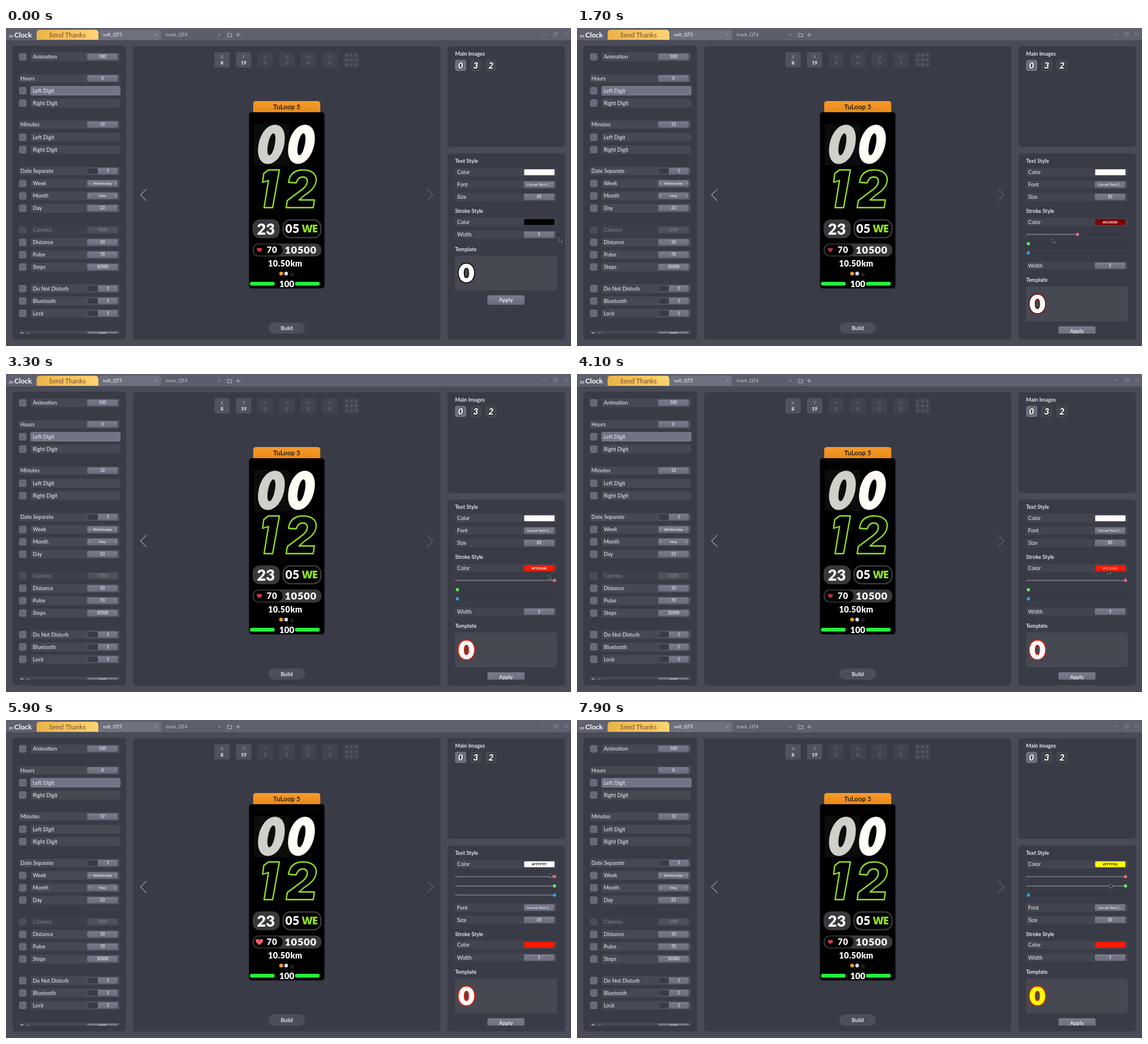
Recreate the animation shown at these times as an HTML page. Size 960 px wide and 540 px high, loop 8000 ms.

```html
<!DOCTYPE html>
<html lang="en">
<head>
<meta charset="utf-8">
<title>Watch face editor</title>
<style>
html, body { margin: 0; width: 100%; height: 100%; overflow: hidden; background: #494b57; }
svg { display: block; width: 960px; height: 540px; font-family: Lato, "Open Sans", sans-serif; font-weight: 500; }
text { white-space: pre; }
</style>
</head>
<body>
<svg id="stage" viewBox="0 0 960 540"></svg>
<script>
const FIELD = 'url(#field)', BAR = '#464854', PANEL = '#393b46', PALE = '#e4e5ea';

// y is the vertical centre of the capitals
const text = (x, y, s, size = 9, fill = PALE, attrs = '') =>
  `<text x="${x}" y="${y + size * .36}" font-size="${size}" fill="${fill}" ${attrs}>${s}</text>`;
const mid = (x, y, s, size, fill, attrs = '') => text(x, y, s, size, fill, 'text-anchor="middle" ' + attrs);
const bold = 'font-weight="700"', heavy = 'font-weight="900"';
const box = (x, y, w, h, fill, r = 2, attrs = '') =>
  `<rect x="${x}" y="${y}" width="${w}" height="${h}" rx="${r}" fill="${fill}" ${attrs}/>`;
const dot = (x, y, r, fill) => `<circle cx="${x}" cy="${y}" r="${r}" fill="${fill}"/>`;
const path = (d, stroke, width = 1, attrs = 'fill="none"') =>
  `<path d="${d}" stroke="${stroke}" stroke-width="${width}" ${attrs}/>`;

// squarish oval around the origin
const oval = (a, b) => {
  const p = a * .6, q = b * .58;
  return `M0 ${-b}C${p} ${-b} ${a} ${-q} ${a} 0S${p} ${b} 0 ${b}S${-a} ${q} ${-a} 0S${-p} ${-b} 0 ${-b}Z`;
};
const zero = (x, y, [a, b, c, d], fill, attrs = '', skew = 0) =>
  `<path transform="translate(${x} ${y}) skewX(${skew})" d="${oval(a, b)}${oval(c, d)}" fill="${fill}" fill-rule="evenodd" ${attrs}/>`;

function field(y, value, x = 138, size = 6.8) {
  return box(x, y - 5.5, 52, 11, FIELD, 1.5) + mid(x + 26, y, value, size, PALE, bold);
}

// kinds of value: undefined, number, 'toggle', or a word with arrows
function listRow(y, label, value, head) {
  const chosen = y == 106.5;
  let s = head ? box(22, y - 7, 172, 14, BAR) :
    box(22, y - 6.5, 13, 13, '#676978', 3) + box(42, y - 7.5, 152, 15, chosen ? '#727485' : BAR, 2,
      chosen ? 'stroke="#8b8d9c" stroke-width=".8"' : '');
  s += text(head ? 24.5 : 45.5, y, label);
  if (value == 'toggle')
    s += box(138.5, y - 5, 51, 10, PANEL, 1.5, 'stroke="#5a5c69" stroke-width=".8"') +
      box(156, y - 5.5, 34, 11, FIELD, 1.5) + mid(173, y, '1', 6.8, PALE, bold);
  else if (typeof value == 'string')
    s += field(y, value, 138, 6.3) +
      path(`M142.5 ${y - 1.5}l-1.5 1.5 1.5 1.5M185.8 ${y - 1.5}l1.5 1.5-1.5 1.5`, PALE, .8);
  else if (value != null) s += field(y, value);
  return s;
}

function titleBar() {
  const tab = (x, w, name, fill, color) => box(x, 3, w, 24, fill, 4) + text(x + 6.5, 11.5, name, 8, color) +
    path(`M${x + w - 9} 10l3 3m0-3l-3 3`, '#b0b1ba', .8);
  return box(0, 0, 960, 21, '#5f616f', 0) + `<g clip-path="url(#title)">` + box(52, 3, 105, 24, 'url(#gold)', 5) +
    tab(158, 105, 'volt_QT5', '#6f717e', '#f2f2f5') + tab(265, 105, 'track_QT4', '#5c5e6b', '#c3c4cc') + '</g>' +
    text(5, 13, 'zo', 7, PALE, bold) + text(14, 12, 'Clock', 12, '#fff', bold) +
    mid(104.5, 11.5, 'Send Thanks', 11.2, '#855331') +
    path('M376.5 9v6h7v-5h-3.5l-1-1zM391 11.5h7m-3.5-3.5v7', '#c3c4cc', .9) +
    path('M912 10.5h7M930.5 9h5v5h-5zM932.5 9v-2h5v5h-2M948 7l7 7m0-7l-7 7', '#858792', .9);
}

function leftPanel() {
  const rows = [
    [49, 'Animation', 100], [85.5, 'Hours', 0, 1], [106.5, 'Left Digit'], [127.5, 'Right Digit'],
    [164, 'Minutes', 12, 1], [185.5, 'Left Digit'], [206.5, 'Right Digit'],
    [243, 'Date Separate', 'toggle', 1], [264, 'Week', 'Wednesday'], [285, 'Month', 'May'], [306, 'Day', 23],
    [364, 'Distance', 10], [385, 'Pulse', 70], [406, 'Steps', 10500],
    [442.5, 'Do Not Disturb', 'toggle'], [463.5, 'Bluetooth', 'toggle'], [484.5, 'Lock', 'toggle'], [521, 'Battery', 100, 1]
  ];
  return box(11, 30, 193, 499, PANEL, 5) + `<g clip-path="url(#list)">` +
    rows.map(r => listRow(...r)).join('') + `<g opacity=".38">${listRow(343, 'Calories', 1000)}</g></g>`;
}

function centrePanel() {
  let s = box(216, 31, 522, 498, PANEL, 5);
  [['X', 8], ['Y', 19], ['H', 0], ['W', 0], ['SX', 0], ['SY', 0]].forEach(([name, value], i) => {
    const x = 354 + i * 36.7, on = i < 2;
    s += box(x, 41, 26, 26, on ? '#50525e' : '#41434e', 3) +
      mid(x + 13, 49, name, 8, on ? '#9a9ca7' : '#5e606b') + mid(x + 13, 59, value, 8.3, on ? '#fff' : '#6c6e79', bold);
  });
  s += box(574, 41, 26, 26, '#41434e', 3);
  for (let i = 0; i < 9; i++) s += dot(579 + i % 3 * 8, 46 + (i / 3 | 0) * 8, 2.3, '#555763');
  return s + path('M238.5 273.5l-10 10 10 10', '#92949f', 1.4) + path('M715.5 273.5l10 10-10 10', '#5d5f6b', 1.4) +
    box(446, 500, 62, 19, '#4c4e5b', 9) + mid(477, 509.5, 'Build', 9, PALE, bold);
}

function watch() {
  const big = [21.8, 33.3, 5.8, 18.5], grey = '#39393c', green = '#92e01f';
  const outline = 'fill="none" stroke-linejoin="round"';
  return box(411, 142, 132, 302, '#34363f', 6) +
    `<path d="M420 143v-14q0-5 5-5h104q5 0 5 5v14z" fill="url(#orange)"/>` + mid(477, 133.5, 'TuLoop 5', 11.2, '#2a2017', bold) +
    box(413, 143, 128, 299, '#000', 5) + box(421, 163, 60, 70, '#0c0c0c', 0) +
    zero(451, 197.5, big, '#d0cfca', '', -10.5) + zero(502, 197.5, big, '#fffdf6', '', -10.5) +
    path('M446 241H464.5L453 305H438.5L446 259L436 262L438 247Z', green, 2.3, outline) +
    path('M480 262C482 248 491 241 505 241C519 241 528 248 527 259C526 270 518 277 507 284L498 292H524L522 305H476L478 293L502 275C509 270 512 266 512 260C512 255 509 253 504 253C499 253 495 257 493 263Z',
      green, 2.3, outline) +
    box(419, 325, 46, 32, grey, 12) + mid(441.5, 341, '23', 26.5, '#fff', heavy) +
    box(471, 326, 64, 30, '#000', 12, `stroke="${grey}" stroke-width="2.5"`) +
    text(474.5, 341, '05', 20.5, '#fff', heavy) +
    text(502.5, 341, 'WE', 18, green, 'font-family="Open Sans, sans-serif" font-weight="800" letter-spacing="-1.2"') +
    box(419, 366, 117, 22, grey, 10) + box(421, 367.5, 49, 19, '#000', 9) +
    text(443, 377, '70', 14.5, '#fff', heavy + ' letter-spacing=".6"') +
    text(473.5, 377, '10500', 17.5, '#fff', heavy + ' letter-spacing=".7"') +
    mid(474.5, 399.5, '10.50km', 14, '#fff', heavy + ' letter-spacing=".4"') +
    dot(467.5, 417, 3.2, '#f29a2c') + dot(476, 417, 3.2, '#d6d6d6') + dot(486, 418.5, 3.2, '#1f1f20') +
    box(414.5, 431, 42, 6.5, '#27ee3f', 3) + box(491, 431, 42, 6.5, '#27ee3f', 3) + mid(477, 434.5, '100', 14.7, '#fff', heavy);
}

function images() {
  return box(750, 31, 200, 171, PANEL, 5) + box(750, 213, 200, 316, PANEL, 5) + text(763, 44, 'Main Images', 9, PALE, bold) +
    ['0', '3', '2'].map((d, i) => box(763 + i * 25.8, 54, 19, 19, i ? '#444650' : '#6f7181', 4) +
      mid(772.3 + i * 25.8, 63.5, d, 15.5, '#fff', heavy + ' font-style="italic" stroke="#111" stroke-width="1.4" paint-order="stroke"')).join('');
}

const clamp = v => Math.max(0, Math.min(1, v));
const ramp = (t, a, b) => clamp((t - a) / (b - a));
const ease = v => v * v * (3 - 2 * v);
const shade = ([r, g, b]) => `rgb(${r},${Math.max(g, Math.max(0, r - 129) * .2 | 0)},${b})`;
const hex = c => '#' + c.map(v => v.toString(16).padStart(2, '0')).join('').toUpperCase();

// time, x, y of the pointer tip
const moves = [
  [0, 940, 356], [500, 906, 329], [700, 906, 329], [1000, 767, 351], [1400, 850, 352], [1700, 808, 358],
  [1900, 850, 351], [2400, 938, 350], [2600, 945, 349], [2800, 945, 349], [3600, 912, 339], [4100, 902, 332],
  [4600, 902, 330], [4900, 906, 245], [5200, 906, 245], [5900, 924, 260], [6300, 932, 281], [6500, 767, 281],
  [6600, 767, 297], [6700, 914, 273], [6900, 914, 273], [7200, 767, 281], [7600, 932, 281], [7900, 905, 278]
];
function pointer(t) {
  const i = Math.max(1, moves.findIndex(m => m[0] >= t)), [a, x, y] = moves[i - 1], [b, u, v] = moves[i];
  const k = ease(ramp(t, a, b));
  return path(`M${x + (u - x) * k} ${y + (v - y) * k}v7l1.7-1.5 1.3 2.5 1.2-.6-1.2-2.4h2.3z`, '#a9aab2', .7, 'fill="#08080a"');
}

function sliders(y, color, open, active) {
  const tints = ['#f0666b', '#62e862', '#2fa3e6'];
  return `<g opacity="${open}">` + color.map((v, i) => {
    const x = 767 + v / 255 * 165, cy = y + [21, 36.7, 52.2][i] * open, on = i == active;
    return path(`M763 ${cy}H936`, '#32343e', 1) + (v ? path(`M763 ${cy}H${x}`, '#7c7e89', 1.5) : '') +
      dot(on ? Math.min(x, 931) : x, cy, on ? 4 : 2.8, tints[i]) + (on ? mid(Math.min(x, 931), cy - 8, v, 7, '#fff', bold) : '');
  }).join('') + '</g>';
}

function stylePanel(t) {
  const strokeOpen = ease(ramp(t, 600, 900)) - ease(ramp(t, 4900, 5200)), textOpen = ease(ramp(t, 4900, 5200));
  const red = Math.round(129 * ease(ramp(t, 1000, 1400)) + 126 * ease(ramp(t, 1900, 2400)));
  const green = Math.round(255 * (1 - ease(ramp(t, 6300, 6500)) + ease(ramp(t, 7200, 7600))));
  const blue = Math.round(255 * (1 - ramp(t, 6400, 6600)));
  const stroke = [red, 0, 0], fill = [255, green, blue];
  const a = 52.5 * textOpen, b = a + 52.5 * strokeOpen;
  const row = (y, label, control) => box(763, y - 7, 173, 14, '#424450') + text(766.5, y, label) + control;
  const swatch = (y, c, open) => box(880.5, y - 5, 51.5, 10, shade(c), 1) +
    mid(906, y, hex(c), 6.3, c[1] > 140 ? '#222' : '#fff', `${bold} opacity="${open}"`);
  const title = (y, s) => text(763, y, s, 9, PALE, bold);
  const hover = t >= 4000 ? .6 : 1;
  return title(226, 'Text Style') + sliders(245, fill, textOpen, t > 7200 && t < 7600 ? 1 : -1) +
    row(245, 'Color', swatch(245, fill, textOpen)) +
    row(266 + a, 'Font', field(266 + a, 'Corvel Text C...', 880, 6.3)) +
    row(287 + a, 'Size', field(287 + a, 85, 880)) +
    title(311 + a, 'Stroke Style') + sliders(329.5 + a, stroke, strokeOpen, (t > 1000 && t < 1400) || (t > 1900 && t < 2800) ? 0 : -1) +
    row(329.5 + a, 'Color', swatch(329.5 + a, stroke, strokeOpen * hover)) +
    row(351 + b, 'Width', field(351 + b, 5, 880)) +
    title(375.5 + b, 'Template') + box(763, 386.5 + b, 173, 59, '#464852', 3) +
    zero(782.3, 416 + b, [13.9, 16.6, 3.7, 8], shade(fill), `stroke="${shade(stroke)}" stroke-width="1.5"`) +
    box(818, 454 + b, 63, 16, FIELD, 2) + mid(849.5, 462 + b, 'Apply', 9, PALE, bold);
}

function heart(t) {
  const phase = t % 1100 / 1100, beat = Math.max(0, 1 - Math.abs(phase - .364) / .17);
  const color = beat > .3 ? '#ee5d6c' : phase > .5 ? '#b52f42' : '#cf3b4c';
  return `<path transform="translate(430.5 377) scale(${.72 + .33 * beat})" d="M0 5C-4 2-6 0-6-2.2C-6-5.8-1.5-6 0-3C1.5-6 6-5.8 6-2.2C6 0 4 2 0 5Z" fill="${color}"/>`;
}

const gradient = (id, from, to, axis = 'x2="0" y2="1"') =>
  `<linearGradient id="${id}" ${axis}><stop stop-color="${from}"/><stop offset="1" stop-color="${to}"/></linearGradient>`;
const clip = (id, x, y, w, h) => `<clipPath id="${id}">${box(x, y, w, h, '#000', 0)}</clipPath>`;

document.getElementById('stage').innerHTML = '<defs>' + gradient('field', '#7a7c8c', '#6a6c7b') +
  gradient('orange', '#f79a2a', '#e98a18') + gradient('gold', '#e9b349', '#fdd473', '') +
  clip('title', 0, 0, 960, 20) + clip('list', 11, 30, 193, 489) + clip('props', 750, 213, 200, 306) + '</defs>' +
  titleBar() + leftPanel() + centrePanel() + watch() + images() +
  '<g id="heart"></g><g id="style-panel" clip-path="url(#props)"></g><g id="pointer"></g>';

const put = (id, s) => { document.getElementById(id).innerHTML = s; };
let shown = -1;
function frame(now) {
  const t = Math.floor(now % 8000 / 100) * 100;
  if (t != shown) {
    shown = t;
    put('heart', heart(t));
    put('style-panel', stylePanel(t));
    put('pointer', pointer(t));
  }
  requestAnimationFrame(frame);
}
frame(0);
</script>
</body>
</html>
```
